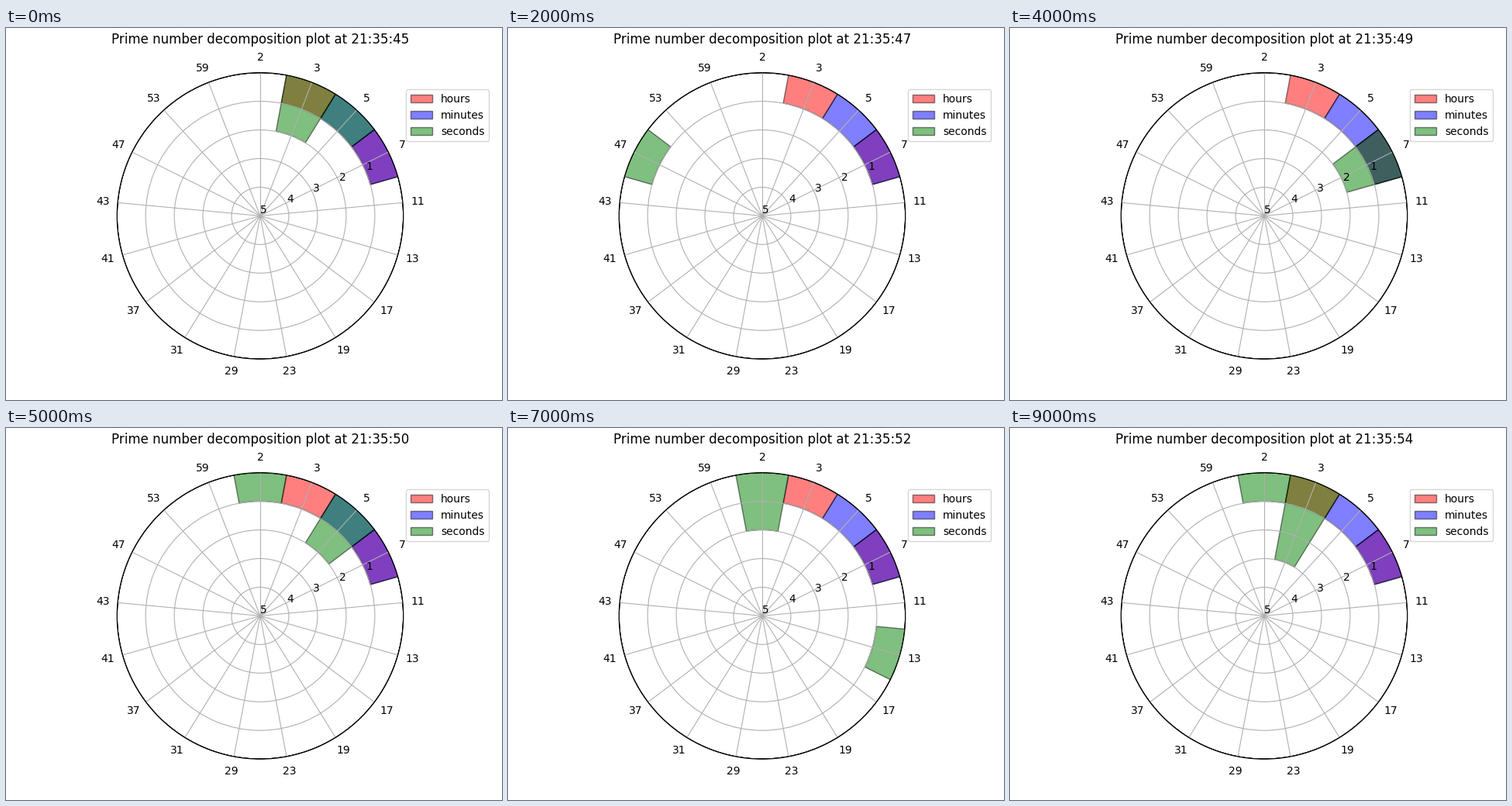
Animation, 640 px wide and 480 px high, one loop 10000 ms. Source, as a matplotlib script:

```python
import numpy as np
import matplotlib.pyplot as plt
from matplotlib.animation import FuncAnimation

PRIMES = [p for p in range(2, 60) if all(p % d for d in range(2, p))]
ANGLES = np.arange(len(PRIMES)) * 2 * np.pi / len(PRIMES)
HOUR, MINUTE, START = 21, 35, 45
SECONDS = 10


def exponents(n):
    """Exponent of every prime in the factorisation of n."""
    powers = []
    for p in PRIMES:
        k = 0
        while n and n % p == 0:
            n //= p
            k += 1
        powers.append(k)
    return powers


def draw_bars(n, color, label):
    return ax.bar(ANGLES, exponents(n), width=ANGLES[1], color=color,
                  edgecolor="k", alpha=0.5, label=label)


fig = plt.figure(figsize=(6.4, 4.8), dpi=100)
ax = fig.add_subplot(projection="polar")
ax.set_theta_zero_location("N")
ax.set_theta_direction(-1)
ax.set_rlabel_position(67.5)

draw_bars(HOUR, "r", "hours")
draw_bars(MINUTE, "b", "minutes")
second_bars = draw_bars(START, "g", "seconds")

ax.set_xticks(ANGLES, PRIMES)
ax.set_yticks(range(1, 6))
ax.set_xlim(0, 2 * np.pi)
ax.set_ylim(5, 0)
ax.legend(loc=(1.01, 0.76))
title = ax.set_title("", y=1.08)


def update(i):
    second = START + i
    for bar, k in zip(second_bars, exponents(second)):
        bar.set_height(k)
    title.set_text("Prime number decomposition plot at "
                   f"{HOUR:02d}:{MINUTE:02d}:{second:02d}")
    return [title, *second_bars]


anim = FuncAnimation(fig, update, frames=SECONDS, interval=1000,
                     init_func=lambda: update(0), repeat=True, repeat_delay=0)
plt.show()
```
